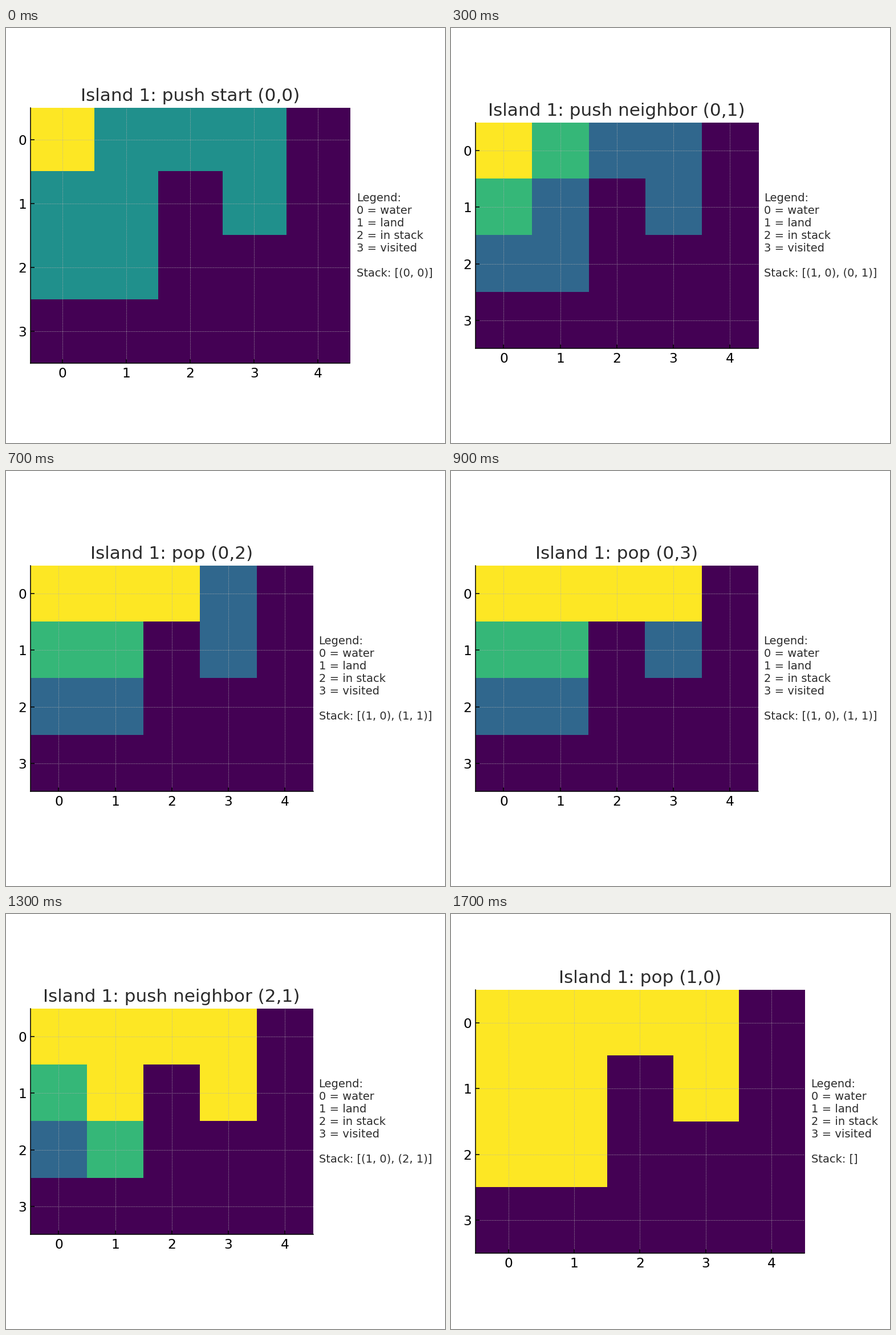
A matplotlib script for the animation above (1.8 s loop, 770x728 px).

```python
import matplotlib.pyplot as plt
import numpy as np
from matplotlib.animation import FuncAnimation

plt.rcParams.update({
    "font.family": "DejaVu Sans",
    "font.size": 10,
    "text.color": "#2b2b2b",
    "axes.titlesize": 16,
    "axes.linewidth": 0.8,
    "axes.spines.top": False,
    "axes.spines.right": False,
    "xtick.labelsize": 12,
    "ytick.labelsize": 12,
    "xtick.direction": "in",
    "ytick.direction": "in",
    "grid.linestyle": ":",
    "grid.linewidth": 0.5,
    "grid.color": "#b0b0b0",
})

GRID = [
    [1, 1, 1, 1, 0],
    [1, 1, 0, 1, 0],
    [1, 1, 0, 0, 0],
    [0, 0, 0, 0, 0],
]
STEPS = [(1, 0), (-1, 0), (0, 1), (0, -1)]
LEGEND = "Legend:\n0 = water\n1 = land\n2 = in stack\n3 = visited\n\nStack: "
LAND, IN_STACK, VISITED = 1, 2, 3
MARGINS = dict(left=0.125, right=0.9, bottom=0.11, top=0.88)


def search(start):
    """Depth-first flood fill; returns one (title, grid, stack) per step."""
    grid = np.array(GRID)
    rows, cols = grid.shape
    stack, states = [], []

    def record(action, cell):
        title = f"Island 1: {action} ({cell[0]},{cell[1]})"
        states.append((title, grid.copy(), list(stack)))

    def push(cell, action):
        grid[cell] = IN_STACK
        stack.append(cell)
        record(action, cell)

    push(start, "push start")
    while stack:
        r, c = stack.pop()
        grid[r, c] = VISITED
        record("pop", (r, c))
        for dr, dc in STEPS:
            cell = r + dr, c + dc
            inside = 0 <= cell[0] < rows and 0 <= cell[1] < cols
            if inside and grid[cell] == LAND:
                push(cell, "push neighbor")
    return states


states = search((0, 0))
fig = plt.figure(figsize=(5.5, 5.2), dpi=140)


def draw(i):
    title, grid, stack = states[i]
    fig.clear()
    fig.subplots_adjust(**MARGINS)
    ax = fig.add_subplot()
    ax.imshow(grid, cmap="viridis")  # colours span the values present
    ax.set_title(title)
    ax.set_xticks(range(grid.shape[1]))
    ax.set_yticks(range(grid.shape[0]))
    ax.grid(True)
    ax.text(1.02, 0.5, f"{LEGEND}{stack}", transform=ax.transAxes, va="center")
    fig.tight_layout()  # the plot shrinks as the stack text grows
    return []


anim = FuncAnimation(fig, draw, frames=len(states), interval=100,
                     init_func=lambda: [], repeat=True, repeat_delay=0)
plt.show()
```
